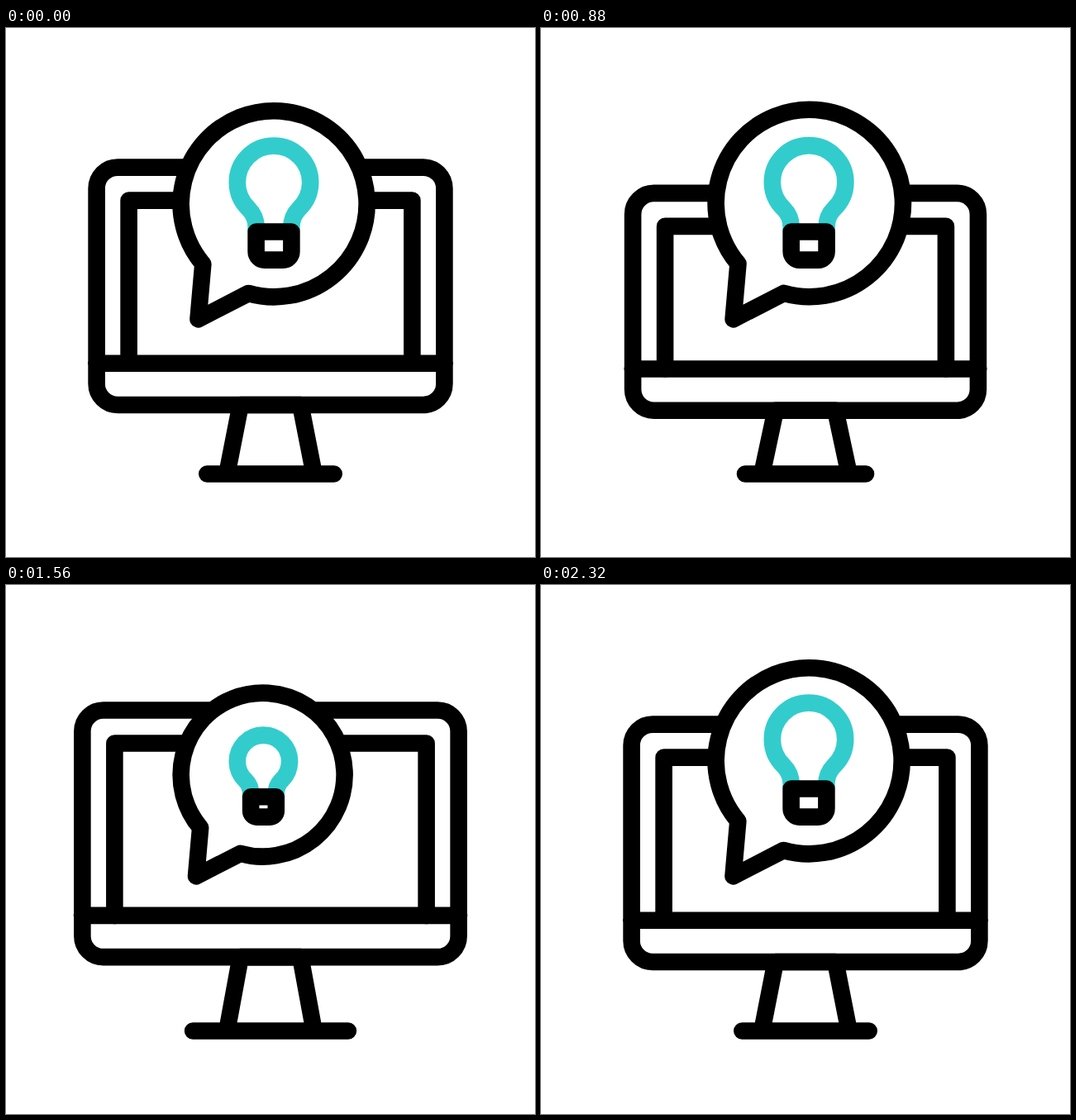
An HTML page that plays this animation: 640x640 px, repeating every 3 s.

```html
<!DOCTYPE html>
<html lang="en">
<head>
<meta charset="utf-8">
<title>Idea on screen</title>
<style>
  html, body { margin: 0; width: 100%; height: 100%; overflow: hidden; background: #fff; }
  svg { display: block; width: 100vw; height: 100vh; }
  path { fill: none; stroke: #000; stroke-width: 20.6; stroke-linecap: round; stroke-linejoin: round; }
  #bubble { fill: #fff; }
  #glass { stroke: #33cccc; stroke-linecap: butt; }
</style>
</head>
<body>
<svg viewBox="0 0 640 640">
  <path id="frame"/>
  <path id="screen"/>
  <path id="stand"/>
  <path id="bubble"/>
  <path id="glass"/>
  <path id="socket"/>
</svg>
<script>
const LOOP = 3000, STEP = 40;

// time, side inset, top shift, bottom shift, foot inset
const monitorKeys = [
  [200, 0, 0, 0, 0],
  [720, 13.1, 51.5, 12.5, 15.9],
  [1240, -38.3, -38, -13, -38.2],
  [1840, 0, 0, 0, 0]
];

// time, bubble radius, bulb radius
const rest = [112.5, 44.2], small = [97.5, 30.35], large = [124.6, 54.5];
const bubbleKeys = [
  [200, ...rest], [449, ...small], [579, ...small], [1124, ...large],
  [1177, ...large], [1623, ...small], [1740, ...small], [2320, ...rest]
];

const smooth = x => x * x * (3 - 2 * x);

function sample(keys, t) {
  const next = keys.findIndex(key => t < key[0]);
  if (next === 0) return keys[0].slice(1);
  if (next < 0) return keys[keys.length - 1].slice(1);
  const a = keys[next - 1], b = keys[next];
  const s = smooth((t - a[0]) / (b[0] - a[0]));
  return a.slice(1).map((v, i) => v + (b[i + 1] - v) * s);
}

const setPath = (id, d) => document.getElementById(id).setAttribute('d', d);

function drawMonitor(t) {
  const [inset, topShift, bottomShift, footInset] = sample(monitorKeys, t);
  const left = 109.6 + inset, right = 640 - left;
  const top = 168.6 + topShift, bottom = 456 + bottomShift;
  const shelf = bottom - 50.3, foot = 243.3 + footInset, r = 25.5;
  const arc = (x, y) => `A${r} ${r} 0 0 1 ${x} ${y}`;

  setPath('frame', `M${left + r} ${top}H${right - r}${arc(right, top + r)}V${bottom - r}
    ${arc(right - r, bottom)}H${left + r}${arc(left, bottom - r)}V${top + r}${arc(left + r, top)}Z
    M${left - .4} ${shelf}H${right + .4}`);
  setPath('screen', `M${left + 39} ${shelf}V${top + 40}H${right - 39}V${shelf}`);
  setPath('stand', `M267.3 539.5L283.7 ${bottom}H356.3L372.7 539.5M${foot} 539.5H${640 - foot}`);
}

function drawBubble(t) {
  const [r, bulb] = sample(bubbleKeys, t);
  const cx = 212 + r, cy = 352.3 - 1.238 * r;
  const onBubble = (x, y) => `${cx + x * r} ${cy + y * r}`;
  setPath('bubble', `M${onBubble(-.766, .645)}A${r} ${r} 0 1 1 ${onBubble(-.277, .96)}
    L${onBubble(-.818, 1.238)}Z`);

  // Bulb units: its radius, measured from the middle of the socket's bottom edge
  const at = (x, y) => `${279.8 + (1 + x) * bulb} ${280.6 + y * bulb}`;
  setPath('glass', `M${at(-.484, -.77)}V${280.6 - .9 * bulb}
    C${at(-.484, -1.1)} ${at(-.56, -1.27)} ${at(-.69, -1.401)}
    A${bulb} ${bulb} 0 1 1 ${at(.69, -1.401)}
    C${at(.56, -1.27)} ${at(.484, -1.1)} ${at(.484, -.9)}L${at(.484, -.77)}`);
  const q = .23, arc = `A${q * bulb} ${q * bulb} 0 0 1 `;
  setPath('socket', `M${at(-.484, -.77)}L${at(.484, -.77)}L${at(.484, -q)}${arc}${at(.484 - q, 0)}
    L${at(q - .484, 0)}${arc}${at(-.484, -q)}Z`);
}

function render(now) {
  const t = Math.floor((now % LOOP) / STEP) * STEP;
  drawMonitor(t);
  drawBubble(t);
}

function tick() {
  render(performance.now());
  requestAnimationFrame(tick);
}
tick();
</script>
</body>
</html>
```
